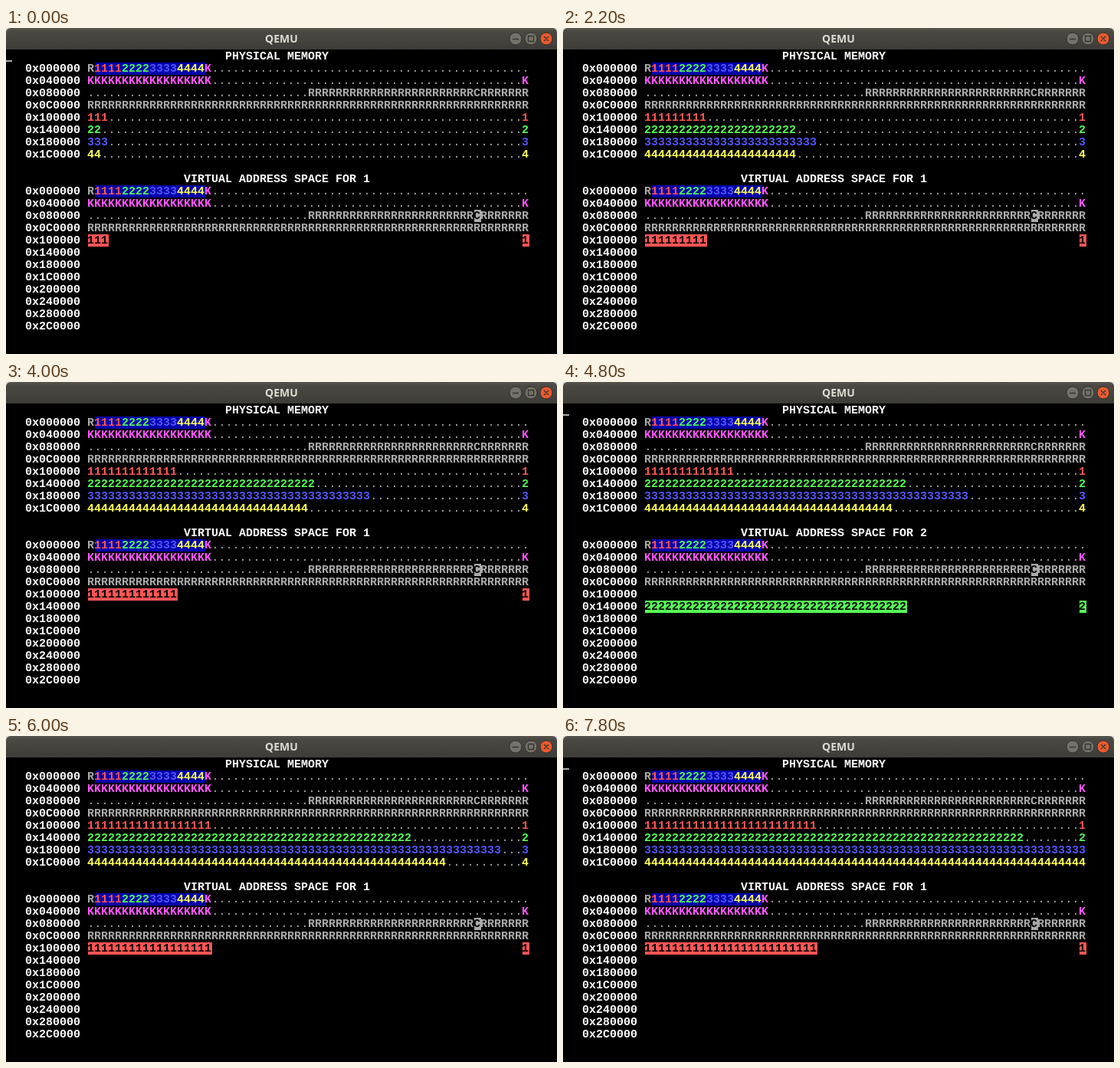
Animation, 719 px wide and 425 px high, one loop 8 s. Source, as an HTML page with a canvas:

```html
<!DOCTYPE html>
<html lang="en">
<head>
<meta charset="utf-8">
<title>QEMU memory map</title>
<style>
  html, body { margin: 0; width: 100%; height: 100%; overflow: hidden; background: #000; }
  canvas { position: absolute; left: 0; top: 0; }
  .bar {
    position: absolute; left: 0; top: 0; width: 719px; height: 28px;
    background: linear-gradient(#57554e, #4b4943 15%, #3d3c38);
    border-radius: 6px 6px 0 0;
  }
  .corners { position: absolute; left: 0; top: 0; width: 719px; height: 8px; background: #d8d8d8; }
  .bar svg { position: absolute; left: 0; top: 0; }
  .bar text { font: 700 14px "Open Sans", "Noto Sans", sans-serif; fill: #dfdbd2; text-anchor: middle; }
  .bar circle { fill: #74726a; stroke: #32312d; }
  .bar circle.close { fill: #ea5a2f; }
  .bar path { fill: none; stroke: #35342f; stroke-width: 1.4; }
</style>
</head>
<body>
<canvas id="screen" width="719" height="425"></canvas>
<div class="corners"></div>
<div class="bar">
  <svg width="719" height="28">
    <text x="359.5" y="19">QEMU</text>
    <circle cx="665" cy="14" r="8"/>
    <circle cx="685" cy="14" r="8"/>
    <circle class="close" cx="705" cy="14" r="8"/>
    <path d="M661 14.5h8M681.5 10.5h7v7h-7zM702 11l6 6m0-6l-6 6"/>
  </svg>
</div>
<script>
const LOOP = 8000, STEP = 200;
const CELL_W = 9, CELL_H = 16, LEFT = -1, TOP = 29;
const DATA_COL = 12, PAGES = 64;
const FACE = '15px "Liberation Mono", monospace';
const GRAY = '#aaaaaa', WHITE = '#ffffff', PINK = '#ff55ff', NAVY = '#0000aa';
const PROCESS_COLORS = ['#ff5555', '#55ff55', '#5555ff', '#ffff55'];

// Allocated pages of each process at a few steps; growth is linear in between.
const KEY_STEPS = [0, 6, 16, 24, 30, 34, 39];
const GROWTH = [
  [3, 6, 12, 13, 18, 20, 25],
  [2, 16, 28, 38, 47, 49, 55],
  [3, 15, 34, 47, 60, 68, 68],
  [2, 16, 27, 36, 52, 57, 64],
];

const ctx = document.getElementById('screen').getContext('2d');

function write(col, row, text, fg, bg) {
  const x = LEFT + col * CELL_W, y = TOP + row * CELL_H;
  if (bg) {
    ctx.fillStyle = bg;
    ctx.fillRect(x, y, text.length * CELL_W, CELL_H);
  }
  ctx.fillStyle = fg;
  [...text].forEach((ch, i) => {
    const dot = ch === '.';
    ctx.font = (dot ? '400 ' : '700 ') + FACE;
    ctx.fillText(ch, x + i * CELL_W - (dot ? 0.5 : 1), y + 12);
  });
}

const page = (index, row, text, fg, bg) => write(DATA_COL + index, row, text, fg, bg);

function labels(top, count) {
  for (let i = 0; i < count; i++) {
    const address = (i * 0x40000).toString(16).toUpperCase().padStart(6, '0');
    write(3, top + i, '0x' + address, WHITE);
  }
}

function kernelRows(top, consoleMapped) {
  page(0, top, 'R', GRAY);
  PROCESS_COLORS.forEach((color, i) => page(1 + i * 4, top, String(i + 1).repeat(4), color, NAVY));
  page(17, top, 'K', PINK);
  page(18, top, '.'.repeat(46), GRAY);
  page(0, top + 1, 'K'.repeat(18), PINK);
  page(18, top + 1, '.'.repeat(45), GRAY);
  page(63, top + 1, 'K', PINK);
  page(0, top + 2, '.'.repeat(32) + 'R'.repeat(24), GRAY);
  page(56, top + 2, 'C', consoleMapped ? '#000' : GRAY, consoleMapped && GRAY);
  page(57, top + 2, 'R'.repeat(7), GRAY);
  page(0, top + 3, 'R'.repeat(PAGES), GRAY);
}

function heapSize(process, step) {
  const next = Math.max(1, KEY_STEPS.findIndex(k => k >= step));
  const from = KEY_STEPS[next - 1], to = KEY_STEPS[next];
  const sizes = GROWTH[process];
  const ratio = (step - from) / (to - from);
  const size = sizes[next - 1] + (sizes[next] - sizes[next - 1]) * ratio;
  return Math.min(PAGES - 1, Math.round(size));
}

function processRow(process, row, step, mapped) {
  const digit = String(process + 1), size = heapSize(process, step);
  const color = PROCESS_COLORS[process];
  const style = mapped ? ['#000', color] : [color];
  page(0, row, digit.repeat(size), ...style);
  if (!mapped) page(size, row, '.'.repeat(PAGES - 1 - size), GRAY);
  page(PAGES - 1, row, digit, ...style);
}

function draw(step) {
  const shown = Math.floor((step + 0.4) / 2.45) % 4;
  const cursorOn = Math.floor((step + 1.1) / 1.33) % 2 === 0;

  ctx.fillStyle = '#000';
  ctx.fillRect(0, 0, 719, 425);

  write(32, 0, 'PHYSICAL MEMORY', WHITE);
  labels(1, 8);
  kernelRows(1, false);
  for (let i = 0; i < 4; i++) processRow(i, 5 + i, step, false);

  write(26, 10, 'VIRTUAL ADDRESS SPACE FOR ' + (shown + 1), WHITE);
  labels(11, 12);
  kernelRows(11, true);
  processRow(shown, 15 + shown, step, true);

  if (cursorOn) {
    ctx.fillStyle = GRAY;
    ctx.fillRect(LEFT, TOP + 13, CELL_W, 2);
  }
}

let lastStep = -1;
function tick() {
  const step = Math.floor(performance.now() % LOOP / STEP);
  if (step !== lastStep) draw(lastStep = step);
  requestAnimationFrame(tick);
}
tick();
</script>
</body>
</html>
```
